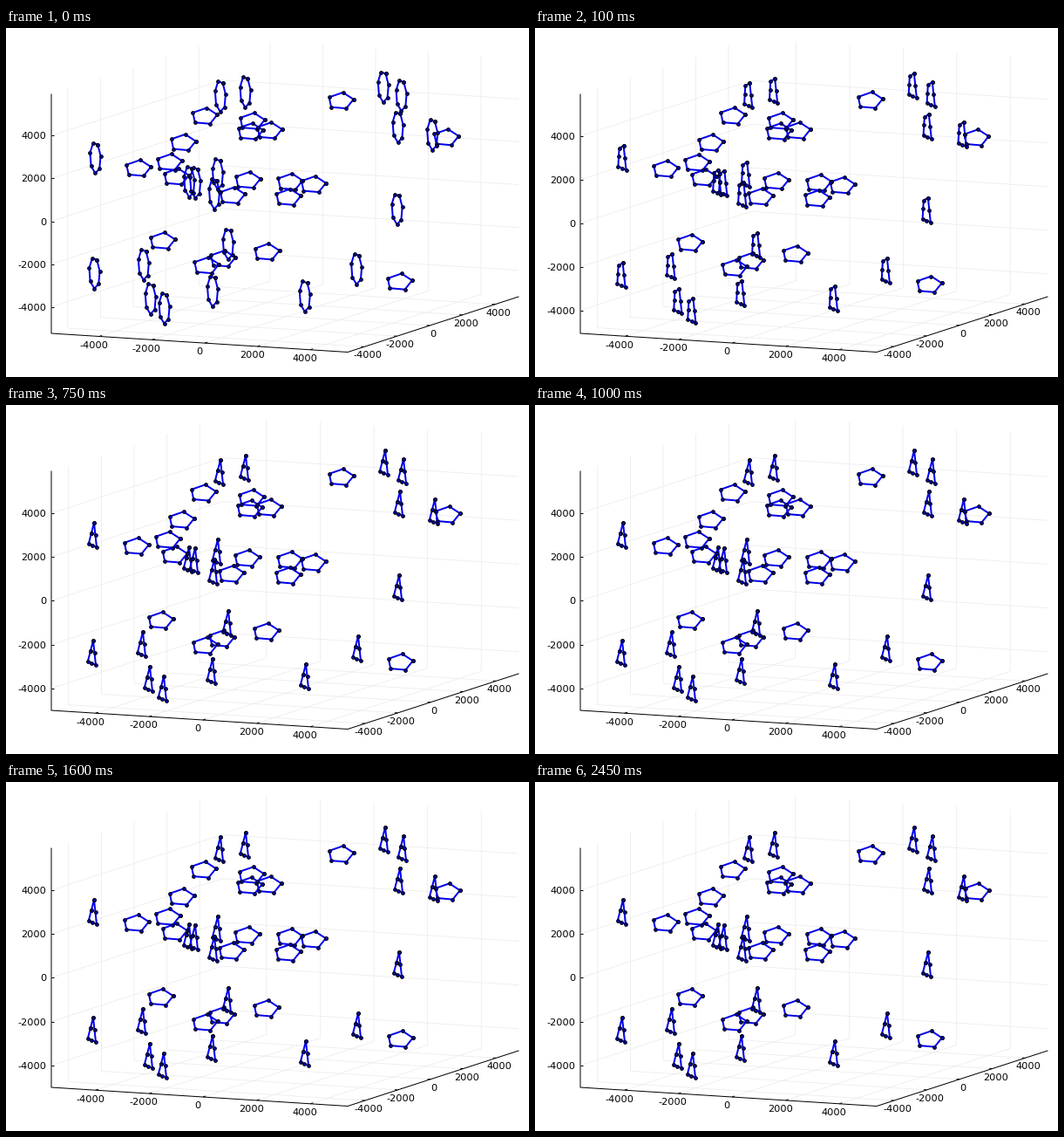
Write a matplotlib script that moves like this. It is 600 by 400 pixels and loops after 2.5 s.

```python
import numpy as np
import matplotlib.pyplot as plt
from matplotlib.animation import FuncAnimation
from matplotlib.collections import LineCollection

W, H, DPI = 600, 400, 100
FRAMES, INTERVAL = 50, 50
PX = 72 / DPI  # points per pixel

# Corners of the axes box on screen
LEFT = np.array([52, 350])
FRONT = np.array([392, 371.5])
RIGHT = np.array([588, 308])
UP = np.array([0, -274])
ALONG_X, ALONG_Y = FRONT - LEFT, RIGHT - FRONT
STEPS = np.arange(-2, 3)

# Where each molecule sits: pentagon centres and ring tips
PENTAGONS = np.array([
    (226, 101), (384, 83), (281, 107), (279, 119), (301, 118), (506, 126),
    (201, 132), (185, 155), (149, 162), (193, 172), (276, 176), (325, 178),
    (352, 181), (323, 196), (258, 194), (177, 247), (298, 260), (247, 268),
    (228, 276), (452, 295)])
TIPS = np.array([
    (246, 63), (275, 58), (435, 52), (456, 62), (452, 99), (492, 108),
    (101, 135), (243, 154), (210, 163), (217, 164), (239, 177), (451, 195),
    (255, 236), (157, 260), (100, 270), (237, 291), (165, 300), (181, 311),
    (404, 265), (344, 297)])
TIP = np.array([1.5, -14.5])  # tip seen from the ring's centre
RINGS = TIPS - TIP


def polygon(n, u, v, first=0):
    """Corners of a regular n-gon spanned by screen vectors u and v."""
    a = 2 * np.pi * (first - np.arange(n)) / n
    return np.outer(np.cos(a), u) + np.outer(np.sin(a), v)


PENTAGON = polygon(5, (14.8, -1.8), (-2, -9.6))
ROUND = polygon(7, (-2.6, -16.8), (5.6, -6), first=1)


def bent_ring(fold):
    """Seven beads on a four-sided loop whose shoulder folds into a side."""
    foot, heel = np.array([-4.7, 9.5]), np.array([4.5, 13.5])
    shoulder = np.array([-3.5, -11.5])
    shoulder = shoulder + fold * ((TIP + foot) / 2 - shoulder)
    x, y = np.array([TIP, shoulder, foot, heel, TIP]).T
    t = np.array([0, 1, 1.45 - 0.45 * fold, 2, 2.5, 3, 3.5])
    return np.column_stack([np.interp(t, range(5), x),
                            np.interp(t, range(5), y)])


def ring_shape(n):
    """The round ring bends over two frames, then eases into a triangle."""
    if n < 2:
        ease = 1 - (1 - n / 2) ** 2
        return ROUND + ease * (bent_ring(0) - ROUND)
    return bent_ring(1 - max(0, 1 - (n - 2) / 3) ** 2)


def rescale(points, s):
    """Screen shift caused by the tighter axis limits at the start."""
    x, y = points.T
    return np.column_stack([x + 0.011 * (370 - x) * s,
                            y - 0.021 * (y - 110) * s])


def outlines(centers, shape):
    """Closed outlines, parted by gaps, as one path."""
    gap = np.full((1, 2), np.nan)
    loop = np.vstack([shape, shape[:1], gap])
    return (centers[:, None] + loop).reshape(-1, 2)


fig = plt.figure(figsize=(W / DPI, H / DPI), dpi=DPI, facecolor="white")
ax = fig.add_axes([0, 0, 1, 1])
ax.set_xlim(0, W)
ax.set_ylim(H, 0)
ax.axis("off")

grid = LineCollection([], colors="#ececec", linewidths=0.8 * PX, zorder=1)
ticks = LineCollection([], colors="black", linewidths=PX, zorder=2)
ax.add_collection(grid)
ax.add_collection(ticks)
frame = np.array([LEFT + UP, LEFT, FRONT, RIGHT])
ax.plot(*frame.T, color="black", lw=PX, zorder=2)
shapes, = ax.plot([], [], color="#0000ee", lw=2 * PX, marker="o",
                  ms=3.7 * PX, mfc="#0000c0", mec="black", mew=PX, zorder=3)


def make_labels(ha):
    return [ax.text(0, 0, str(2000 * k), ha=ha, va="center_baseline",
                    family="DejaVu Sans", size=11.4 * PX, zorder=4)
            for k in STEPS]


x_labels, y_labels, z_labels = map(make_labels, ("center", "center", "right"))


def update_axes(s):
    xs = 226 + 2 * s + (61.6 - 1.1 * s) * STEPS
    ys = 487 - s + 37.6 * STEPS
    zs = 224.4 - 2.9 * s - (50.2 - 1.1 * s) * STEPS
    lines, marks = [], []
    for i in range(len(STEPS)):
        px = LEFT + ALONG_X * (xs[i] - LEFT[0]) / ALONG_X[0]
        py = FRONT + ALONG_Y * (ys[i] - FRONT[0]) / ALONG_Y[0]
        pz = np.array([LEFT[0], zs[i]])
        far_x, far_y = px + ALONG_Y, py - ALONG_X
        lines += [[px, far_x, far_x + UP],
                  [py, far_y, far_y + UP],
                  [pz, pz + ALONG_Y, pz + ALONG_Y + ALONG_X]]
        marks += [[px, px + ALONG_Y * 0.016],
                  [py, py - ALONG_X * 0.01],
                  [pz, pz + (3, 0)]]
        x_labels[i].set_position(px + (-6.3, 9.3))
        y_labels[i].set_position(py + (4, 9))
        z_labels[i].set_position((46.5, zs[i]))
    grid.set_segments(lines)
    ticks.set_segments(marks)


def update(n):
    s = 0.45 ** n
    update_axes(s)
    path = np.vstack([outlines(rescale(PENTAGONS, s), PENTAGON),
                      outlines(rescale(RINGS, s), ring_shape(n))])
    shapes.set_data(*path.T)
    return [shapes]


anim = FuncAnimation(fig, update, frames=FRAMES, interval=INTERVAL,
                     init_func=lambda: update(0), repeat=True, repeat_delay=0)
plt.show()
```
